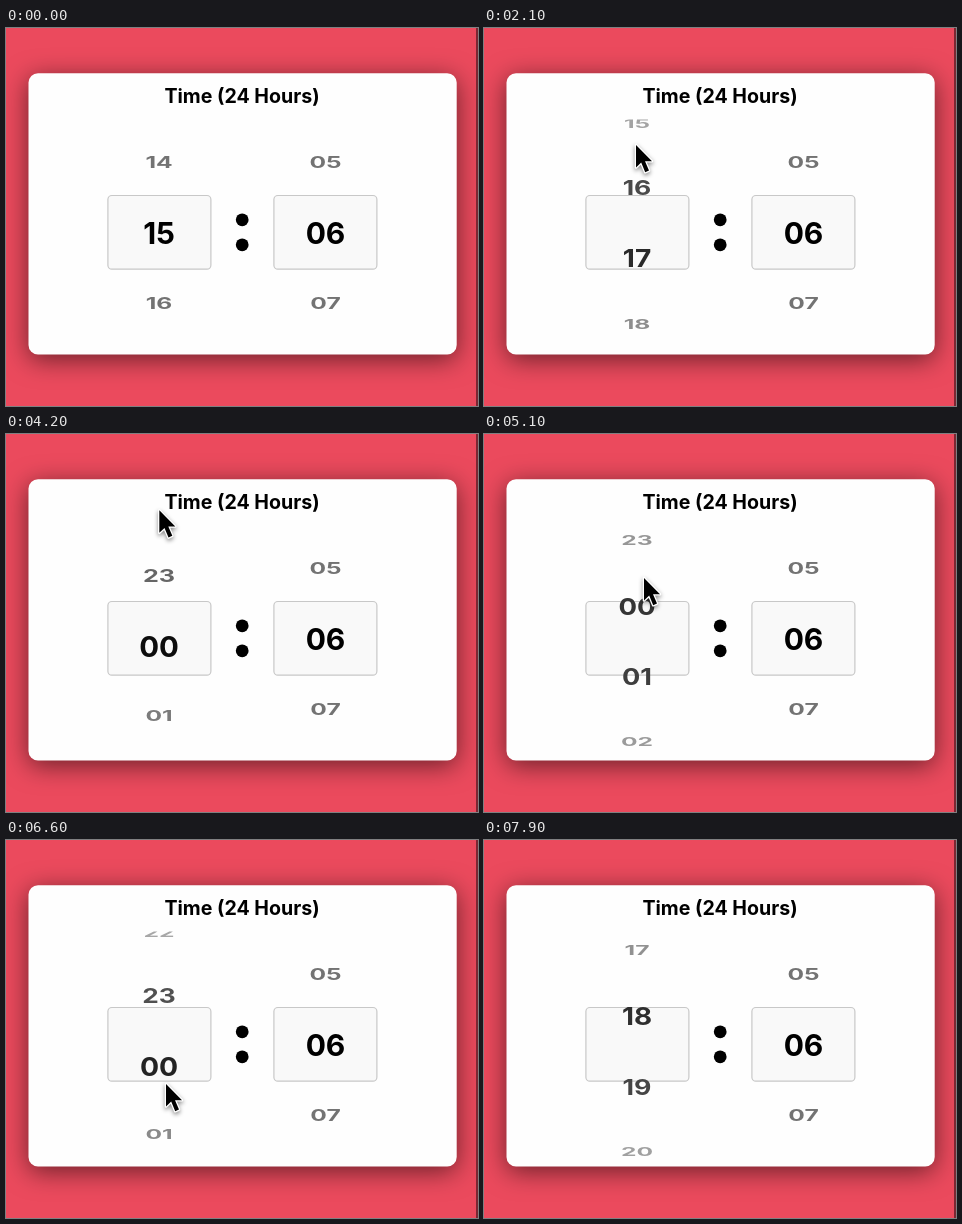
An HTML page that plays this animation: 472 px wide and 378 px high, repeating every 8 s.

```html
<!DOCTYPE html>
<html lang="en">
<head>
<meta charset="utf-8">
<title>Time picker</title>
<style>
  html, body { margin: 0; width: 100%; height: 100%; overflow: hidden; background: #eb4a5d; }
  svg { display: block; }
  text { font-family: Inter, "Liberation Sans", sans-serif; font-weight: 700; text-anchor: middle; }
  .wheel { font-size: 30px; }
  .title { font-size: 19.6px; }
  .card { fill: #fefefe; filter: drop-shadow(0 5px 13px rgba(0, 0, 0, .55)); }
  .slot { fill: #f9f9f9; stroke: #c8c8c8; stroke-width: 1.2; }
  #cursor { filter: drop-shadow(0 2px 2px rgba(0, 0, 0, .45)); }
</style>
</head>
<body>
<svg width="472" height="378" viewBox="0 0 472 378">
  <clipPath id="window"><rect x="90" y="91.5" width="300" height="225.5"/></clipPath>
  <rect class="card" x="22.5" y="45.2" width="428.2" height="281.4" rx="9.5"/>
  <rect x="470" width="2" height="378" fill="#7a2733"/>
  <text class="title" x="236" y="74.5">Time (24 Hours)</text>
  <rect class="slot" x="101.900" y="167.500" width="103" height="73.700" rx="4"/>
  <rect class="slot" x="267.900" y="167.500" width="103" height="73.700" rx="4"/>
  <circle cx="236.2" cy="191.8" r="6.4"/>
  <circle cx="236.2" cy="216.8" r="6.4"/>
  <g clip-path="url(#window)">
    <g class="wheel" id="hours"></g>
    <g class="wheel" id="minutes"></g>
  </g>
  <path id="cursor" d="M1 2V24.500L6.200 19.600L10.200 29.200L14 27.500L10 18.200H17Z"
    stroke="#fff" stroke-width="2.6" stroke-linejoin="round" paint-order="stroke"/>
</svg>
<script>
const LOOP = 8000, STEP = 100;
const $ = id => document.getElementById(id);
const clamp = k => Math.min(1, Math.max(0, k));
const smooth = k => k * k * (3 - 2 * k);
const easeOut = k => 1 - (1 - k) ** 3;
const lerp = (a, b, k) => a + (b - a) * k;

// Turning points of the pointer: time, x, y
const path = [
  [600, 9, 332], [1600, 150, 260], [1900, 150, 260], [2100, 151, 115],
  [3400, 159, 270], [3900, 152, 0], [4700, 153, 235], [5000, 157, 202],
  [5100, 159, 142], [6000, 159, 262], [6600, 159, 242], [7800, 163, 311]
];
const [enter, leave] = [path[0][0], path.at(-1)[0]];

function pointer(t) {
  const i = Math.max(1, path.findIndex(p => p[0] >= t));
  const [t0, x0, y0] = path[i - 1], [t1, x1, y1] = path[i];
  const k = smooth((t - t0) / (t1 - t0));
  return [lerp(x0, x1, k), lerp(y0, y1, k)];
}

const fling = (t, start, end, from, to) =>
  lerp(from, to, easeOut(clamp((t - start) / (end - start))));
const scrub = t => 24 - (pointer(t)[1] - 202) * .0077;

function hourAt(t) {
  if (t < 3500) return fling(t, 1900, 2760, 15, 18);
  if (t < 5000) return fling(t, 3500, 4450, 18, 24);
  if (t < 6900) return scrub(t);
  return fling(t, 6900, 7750, scrub(6900), 18.4);
}

function makeWheel(id, x, count) {
  const labels = Array.from({ length: 5 }, () => {
    const el = document.createElementNS("http://www.w3.org/2000/svg", "text");
    el.setAttribute("y", 10.9);
    $(id).append(el);
    return el;
  });
  // Labels shrink, flatten and fade with distance u from the slot
  return pos => labels.forEach((el, i) => {
    const n = Math.round(pos) + i - 2;
    const u = n - pos, d = Math.abs(u), near = Math.min(1, d), far = d - near;
    const y = 204.7 + Math.sign(u) * (70.5 * d - 10.5 * far);
    const sx = 1 - .18 * near;
    const sy = 1 - .48 * near - .2 * far;
    const grey = Math.round(115 * near + 75 * far);
    el.textContent = String((n + count) % count).padStart(2, "0");
    el.setAttribute("transform", `translate(${x} ${y}) scale(${sx} ${sy})`);
    el.setAttribute("fill", `rgb(${grey},${grey},${grey})`);
  });
}

const setHours = makeWheel("hours", 153, 24);
makeWheel("minutes", 319.5, 60)(6);

const begin = performance.now();
function draw() {
  const elapsed = Math.max(0, performance.now() - begin) % LOOP;
  const t = Math.floor(elapsed / STEP) * STEP;
  const shown = t >= enter && t <= leave;
  setHours(hourAt(t));
  $("cursor").style.display = shown ? "" : "none";
  if (shown) $("cursor").setAttribute("transform", `translate(${pointer(t)})`);
  requestAnimationFrame(draw);
}
draw();
</script>
</body>
</html>
```
